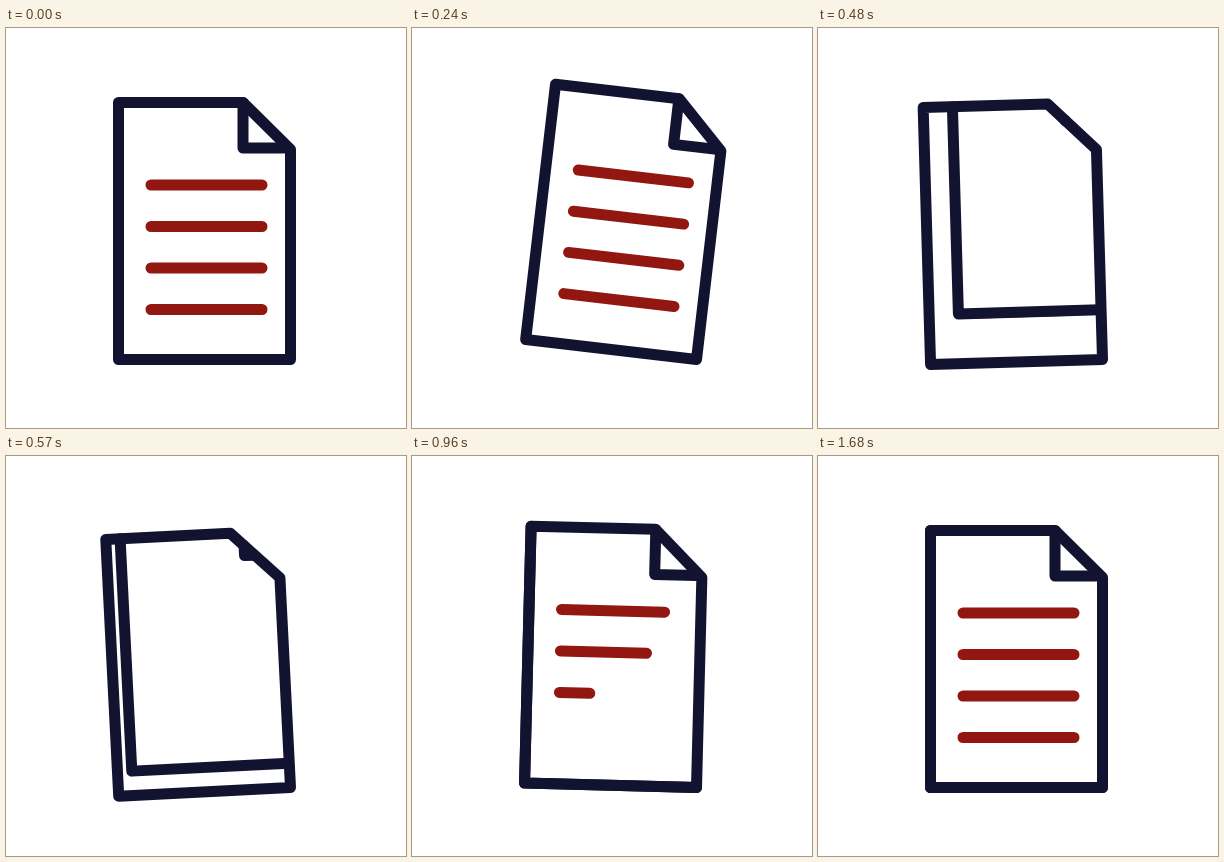
Write an HTML page that moves like this. It is 400 by 400 pixels and loops after 4400 ms.

```html
<!DOCTYPE html>
<html lang="en">
<head>
<meta charset="utf-8">
<title>Page turn</title>
<style>
  html, body { margin: 0; width: 100%; height: 100%; overflow: hidden; background: #fff; }
  svg { display: block; width: 100%; height: 100%; }
  path { fill: none; stroke: #121331; stroke-width: 11; stroke-linecap: round; stroke-linejoin: round; }
  .text { stroke: #911710; }
  .lid { fill: #fff; stroke: none; }
</style>
</head>
<body>
<svg viewBox="0 0 400 400">
  <g id="page">
    <path class="text" d="M145 157H256M145 198.5H256M145 240H256M145 281.5H256"/>
    <path class="lid" id="lid"/>
    <path id="turn"/>
    <path id="fold"/>
    <path class="text" id="lines"/>
    <path d="M112.5 74.5H237L284.5 121.5V331.5H112.5Z"/>
  </g>
</svg>
<script>
const LOOP = 4400, STEP = 30, END = 1680;
const [page, lid, turn, fold, lines] =
  ['page', 'lid', 'turn', 'fold', 'lines'].map(id => document.getElementById(id));

// Corner flap: top, inner corner, right end; open it covers the whole page.
const FOLDED = [[237, 74.5], [237, 120], [278, 120]];
const OPEN = [[112.5, 74.5], [112.5, 331.5], [284.5, 331.5]];
const SEED = [254, 91.4];
const LINE_Y = [157, 198.5, 240, 281.5];
// Tilt keys: time in ms, angle in degrees
const TILT = [[0, 0], [276, 7], [541, -3], [867, 2], [1140, 0]];

const clamp = v => Math.min(1, Math.max(0, v));
const smooth = s => s * s * (3 - 2 * s);
const mix = (a, b, p) => a + (b - a) * p;
const mixPoint = (a, b, p) => a.map((v, i) => mix(v, b[i], p));
const toPath = points => 'M' + points.map(p => p.join(' ')).join('L');

// cubic-bezier(1/3, 0, 0, 1), solved by bisection
function settle(x) {
  if (x <= 0 || x >= 1) return clamp(x);
  let low = 0, high = 1;
  for (let i = 0; i < 24; i++) {
    const s = (low + high) / 2;
    if (s * (1 - s) ** 2 + s ** 3 < x) low = s; else high = s;
  }
  return smooth(low);
}
const progress = (t, start, length) => settle((t - start) / length);

function tilt(t) {
  for (let i = 1; i < TILT.length; i++) {
    const [t0, a] = TILT[i - 1], [t1, b] = TILT[i];
    if (t < t1) return mix(a, b, smooth((t - t0) / (t1 - t0)));
  }
  return 0;
}

function draw(t) {
  page.setAttribute('transform', `rotate(${tilt(t)} 284.5 331.5)`);

  const opening = progress(t, 223, 660);
  const flap = FOLDED.map((p, i) => mixPoint(p, OPEN[i], opening));
  turn.setAttribute('d', toPath(flap));
  lid.setAttribute('d', toPath([...flap, [284.5, 121.5], [237, 74.5]]) + 'Z');

  const folding = progress(t, 462, 620);
  fold.setAttribute('d', folding ? toPath(FOLDED.map(p => mixPoint(SEED, p, folding))) : '');

  lines.setAttribute('d', LINE_Y.map((y, i) => {
    const p = progress(t, 525 + 150 * i, 715);
    return p > 0.02 ? `M145 ${y}H${mix(145, 256, p)}` : '';
  }).join(''));
}

const start = performance.now();
function tick() {
  const t = (performance.now() - start) % LOOP;
  draw(t >= END ? LOOP : Math.floor(t / STEP) * STEP);
  requestAnimationFrame(tick);
}
tick();
</script>
</body>
</html>
```
